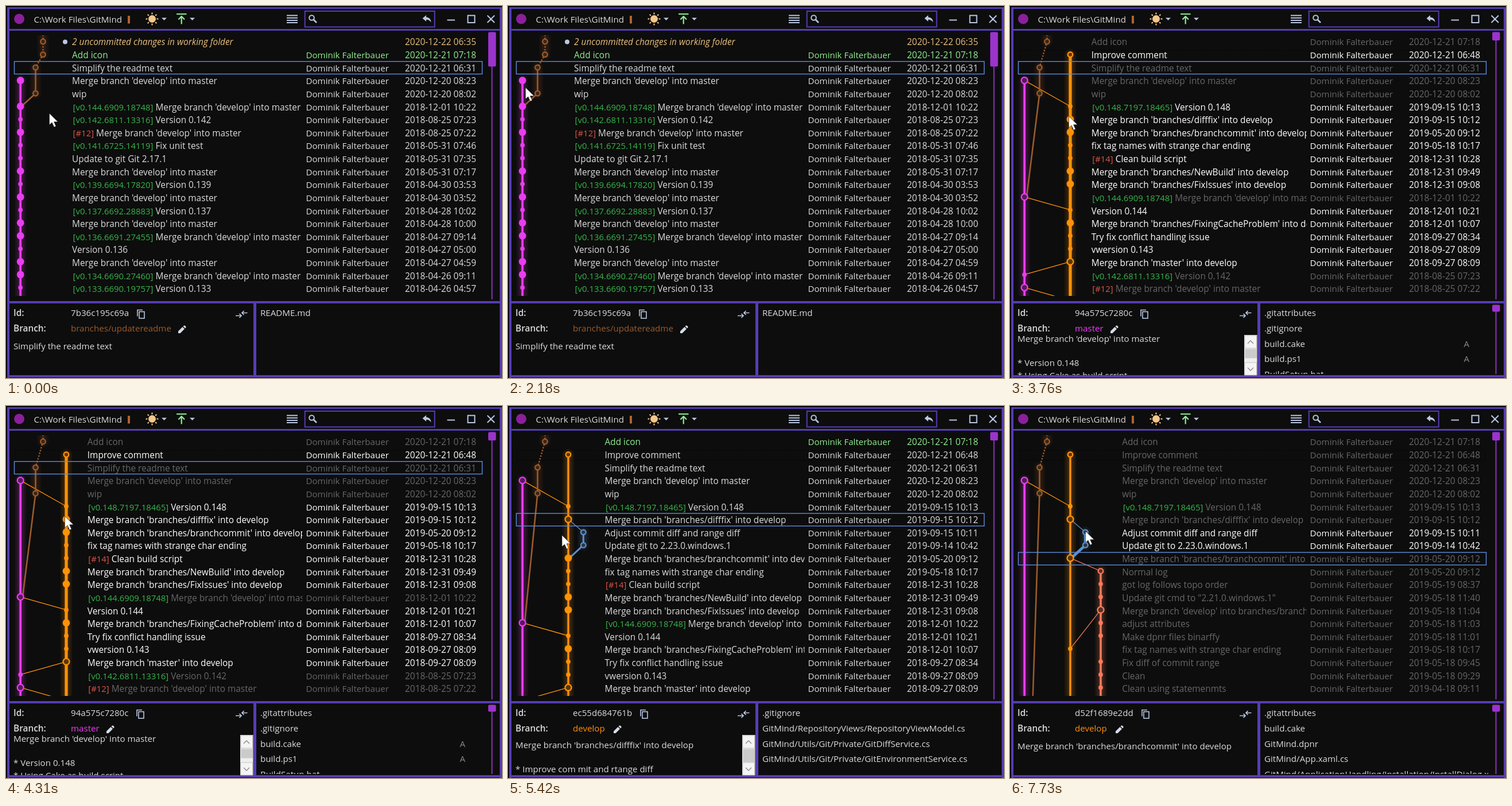
These frames come from a looping animation (864x648 px, 8000 ms). An HTML page:

```html
<!DOCTYPE html>
<html lang="en">
<head>
<meta charset="utf-8">
<title>Commit graph</title>
<style>
  html, body { margin: 0; width: 100%; height: 100%; overflow: hidden; background: #000; }
  svg { display: block; width: 100vw; height: 100vh; }
  text { font: 15.1px "Open Sans", "Noto Sans", sans-serif; fill: #dcdcdc; white-space: pre; }
  .message { font-size: 15.38px; }
  .date { font-size: 15.45px; }
  .tag { font-size: 14.9px; }
  .bold { font-size: 15.4px; font-weight: 600; }
  .line { fill: none; stroke: #b9c7e4; stroke-width: 2; }
</style>
</head>
<body>
<svg viewBox="0 0 864 648" xmlns="http://www.w3.org/2000/svg">
  <defs>
    <clipPath id="graphClip"><rect x="7" y="51" width="400" height="454"/></clipPath>
    <clipPath id="textClip"><rect x="90" y="44" width="426.5" height="468"/></clipPath>
    <clipPath id="infoClip"><rect x="7" y="519" width="400" height="124"/></clipPath>
    <clipPath id="fileClip"><rect x="437" y="519" width="396" height="122"/></clipPath>
    <g id="pencil" fill="#d5dbe8"><path d="M0 10.5V14H3.5L11 6.500 7.500 3ZM8.500 2 12 5.500 13.500 4Q14 3 13 2L12 1Q11 0 10 .7Z"/></g>
    <g id="copy" class="line" style="stroke-width:1.6"><path d="M1 12V1H10"/><rect x="4" y="4" width="9" height="11.500"/></g>
  </defs>
  <rect x="2" y="2" width="862" height="646" fill="#0d0d0d"/>
  <g fill="#553db4">
    <rect x="2" y="2" width="862" height="3"/>
    <rect x="2" y="2" width="4" height="646"/>
    <rect x="860" y="2" width="4" height="646"/>
    <rect x="2" y="40" width="862" height="3"/>
    <rect x="2" y="514" width="862" height="4"/>
    <rect x="2" y="643" width="862" height="4"/>
    <rect x="431" y="514" width="5" height="132"/>
  </g>
  <circle cx="23" cy="22.500" r="9" fill="#8c1f9c"/>
  <text x="48.500" y="28.700" style="font-size:15.2px">C:\Work Files\GitMind</text>
  <rect x="212" y="17" width="4" height="13.500" fill="#b0652f"/>
  <g id="sun" stroke="#f3c98f" stroke-width="2"><circle cx="254.500" cy="22.500" r="6.500" fill="#f5c78a" stroke="none"/></g>
  <path d="M271 20.500h9l-4.500 4.500ZM320 20.500h9l-4.500 4.500Z" fill="#b9c7e4"/>
  <path d="M297 14H314.500M305.700 31.500V18M300.500 23.500 305.700 18 311 23.500" fill="none" stroke="#8eec92" stroke-width="2.200"/>
  <path class="line" d="M489 16.500h19M489 20.700h19M489 24.900h19M489 29.100h19"/>
  <rect x="520.700" y="9" width="226" height="27.500" fill="none" stroke="#553db4" stroke-width="2"/>
  <g class="line"><circle cx="532.500" cy="20.500" r="4.300"/><path d="M535.500 23.500 541 29" stroke-width="2.600"/></g>
  <path d="M725.500 21.500 732 16V19.500Q740 20 740.500 28.500 738 24 732 23.800V27Z" fill="#b9c7e4"/>
  <path class="line" d="M768.500 24.500H782M804.500 16.500H816.500V29H804.500ZM838.500 16.500 851 29M851 16.500 838.500 29"/>
  <path class="line" style="stroke-width:1.700" d="M400 539.500H410M406.500 536 410 539.500 406.500 543M420.500 534.500H411M414.500 531 411 534.500 414.500 538"/>
  <text class="bold" x="13" y="540">Id:</text>
  <text class="bold" x="13" y="566.500">Branch:</text>
  <g id="view"></g>
  <path id="cursor" d="M0 0V20L4.600 16 8.200 24 11.600 22.500 8.200 14.800H15Z" fill="#fff" stroke="#111" stroke-width=".6"/>
</svg>
<script>
const $ = id => document.getElementById(id);
const LOOP = 8000, ROWS = 20, AUTHOR = 'Dominik Falterbauer';

const branches = {
  u: { x: 64.5, color: '#9c5b2b', width: 2.5, parent: 's' },
  m: { x: 25.2, color: '#e93df2', width: 3.8 },
  s: { x: 51.5, color: '#9c5b2b', width: 2.6, parent: 'm' },
  d: { x: 105, color: '#ff9108', width: 3.4 },
  b: { x: 131.3, color: '#5f8fc6', width: 3, parent: 'd' },
  c: { x: 158, color: '#f97a5c', width: 3.6, parent: 'd' }
};
const order = Object.keys(branches).join('');

// Each line: branch, node kind, date, text. A kind naming a branch is a merge from it;
// "x" merges from an unlisted branch, "o" is a ring, "." a plain dot.
const log = `
uo 2020-12-22 06:35 2 uncommitted changes in working folder
uo 2020-12-21 07:18 Add icon
do 2020-12-21 06:48 Improve comment
so 2020-12-21 06:31 Simplify the readme text
md 2020-12-20 08:23 Merge branch 'develop' into master
so 2020-12-20 08:02 wip
d. 2019-09-15 10:13 [v0.148.7197.18465] Version 0.148
db 2019-09-15 10:12 Merge branch 'branches/difffix' into develop
bo 2019-09-15 10:11 Adjust commit diff and range diff
bo 2019-09-14 10:42 Update git to 2.23.0.windows.1
dc 2019-05-20 09:12 Merge branch 'branches/branchcommit' into develop
co 2019-05-20 09:12 Normal log
c. 2019-05-19 08:37 got log follows topo order
c. 2019-05-18 11:40 Update git cmd to "2.21.0.windows.1"
cd 2019-05-18 11:04 Merge branch 'develop' into branches/branchcommit
c. 2019-05-18 11:03 adjust attributes
c. 2019-05-18 11:01 Make dpnr files binarffy
d. 2019-05-18 10:17 fix tag names with strange char ending
c. 2019-05-18 09:45 Fix diff of commit range
c. 2019-05-18 09:29 Clean
c. 2019-04-18 09:11 Clean using statemenmts
${'c. 2019-04-18 09:00 Clean\n'.repeat(11)}d. 2018-12-31 10:28 [#14] Clean build script
dx 2018-12-31 09:49 Merge branch 'branches/NewBuild' into develop
dx 2018-12-31 09:08 Merge branch 'branches/FixIssues' into develop
md 2018-12-01 10:22 [v0.144.6909.18748] Merge branch 'develop' into master
d. 2018-12-01 10:21 Version 0.144
dx 2018-12-01 10:07 Merge branch 'branches/FixingCacheProblem' into develop
d. 2018-09-27 08:34 Try fix conflict handling issue
d. 2018-09-27 08:09 vwersion 0.143
dm 2018-09-27 08:09 Merge branch 'master' into develop
m. 2018-08-25 07:23 [v0.142.6811.13316] Version 0.142
md 2018-08-25 07:22 [#12] Merge branch 'develop' into master
d. 2018-08-25 07:20 Version 0.142
m. 2018-05-31 07:46 [v0.141.6725.14119] Fix unit test
m. 2018-05-31 07:35 Update to git Git 2.17.1
md 2018-05-31 07:17 Merge branch 'develop' into master
m. 2018-04-30 03:53 [v0.139.6694.17820] Version 0.139
md 2018-04-30 03:52 Merge branch 'develop' into master
m. 2018-04-28 10:02 [v0.137.6692.28883] Version 0.137
md 2018-04-28 10:00 Merge branch 'develop' into master
md 2018-04-27 09:14 [v0.136.6691.27455] Merge branch 'develop' into master
m. 2018-04-27 05:00 Version 0.136
md 2018-04-27 04:59 Merge branch 'develop' into master
md 2018-04-26 09:11 [v0.134.6690.27460] Merge branch 'develop' into master
m. 2018-04-26 04:57 [v0.133.6690.19757] Version 0.133`.trim().split('\n').map(l => {
  const [, tag, text] = l.slice(20).match(/^(\[.*?\])?(.*)/);
  return { branch: l[0], kind: l[1], date: l.slice(3, 19), tag, text };
});

const details = {
  readme: { id: '7b36c195c69a', branch: 'branches/updatereadme', color: '#9c5b2b', copyX: 228, editX: 300,
    top: 598, text: ['Simplify the readme text'], files: ['README.md'] },
  master: { id: '94a575c7280c', branch: 'master', color: '#f03df5', copyX: 227, editX: 175, thumb: 16, scroll: true,
    top: 585, text: ["Merge branch 'develop' into master", '', '* Version 0.148', '* Using Cake as build script'],
    files: ['.gitattributes', '.gitignore', 'build.cake', 'build.ps1', 'BuildSetup.bat'], added: [2, 3] },
  difffix: { id: 'ec55d684761b', branch: 'develop', color: '#ff9108', copyX: 230, editX: 184, thumb: 23,
    top: 595.5, text: ["Merge branch 'branches/difffix' into develop", '', '* Improve com mit and rtange diff'],
    files: ['.gitignore', 'GitMind/RepositoryViews/RepositoryViewModel.cs',
      'GitMind/Utils/Git/Private/GitDiffService.cs', 'GitMind/Utils/Git/Private/GitEnvironmentService.cs'] },
  branchcommit: { id: 'd52f1689e2dd', branch: 'develop', color: '#ff9108', copyX: 229, editX: 184, scroll: true,
    top: 598, text: ["Merge branch 'branches/branchcommit' into develop"],
    files: ['.gitattributes', 'build.cake', 'GitMind.dpnr', 'GitMind/App.xaml.cs',
      'GitMind/ApplicationHandling/Installation/InstallDialog.xaml'] }
};

// Every step keeps what the previous one set.
const steps = [
  { at: 0, tip: [75.5, 187], shown: 'ums', scroll: 0, selected: 2, hover: '', info: 'readme' },
  { at: 100, tip: [68.5, 185] },
  { at: 2180, tip: [30.5, 142] },
  { at: 2260, tip: [22.5, 131], hover: 'm' },
  { at: 3120, shown: 'umsd', scroll: 1, info: 'master' },
  { at: 3370, tip: [40, 134], hover: '' },
  { at: 3450, tip: [66, 158] },
  { at: 3530, tip: [82, 178] },
  { at: 3680, tip: [94, 188] },
  { at: 3760, tip: [102.5, 192], hover: 'd' },
  { at: 4380, shown: 'umsdb', selected: 6, hover: '', info: 'difffix' },
  { at: 5190, tip: [103, 197], hover: 'd' },
  { at: 5265, tip: [101, 205] },
  { at: 5340, tip: [98, 215], hover: '' },
  { at: 5415, tip: [94, 225] },
  { at: 5490, tip: [90, 234] },
  { at: 5565, tip: [89, 242] },
  { at: 5640, tip: [91, 247] },
  { at: 5870, tip: [107.5, 255] },
  { at: 6020, tip: [107.5, 264], selected: 9, info: 'branchcommit' },
  { at: 6130, shown: 'umsdbc' },
  { at: 7410, tip: [119, 219] },
  { at: 7730, tip: [131.5, 218], hover: 'b' }
];
steps.forEach((step, i) => { steps[i] = { ...steps[i - 1], ...step }; });

const label = (x, y, text, attrs = '') => `<text x="${x}" y="${y}" ${attrs}>${text}</text>`;
const box = (x, y, w, h, attrs) => `<rect x="${x}" y="${y}" width="${w}" height="${h}" ${attrs}/>`;
const stroke = (x1, y1, x2, y2, color, width, extra = '') =>
  `<path d="M${x1} ${y1}L${x2} ${y2}" stroke="${color}" stroke-width="${width}" fill="none" ${extra}/>`;
const scrollbar = (top, thumb, bottom) => stroke(846.5, top, 846.5, bottom, '#8f31bd', 2) +
  box(840, top, 13.5, thumb, 'rx="2" fill="#9a34cb"');

function drawGraph(entries, { scroll, hover, shown }) {
  const rowY = i => 62 + 22.55 * (i - scroll);
  const next = (i, branch) => entries.findIndex((e, j) => j > i && e.branch === branch);
  const dots = 'stroke-dasharray="2.5 2.5"';
  let glow = '', links = '', trunks = '', nodes = '';

  for (const key of shown) {
    const { x, color, width, parent } = branches[key];
    const rows = entries.flatMap((e, i) => e.branch === key ? [i] : []);
    const first = rows[0], last = rows[rows.length - 1];
    const top = key === 'u' ? 40 : rowY(first);
    const bottom = parent ? rowY(last) : 520;
    const wide = width + (key === hover ? 1.8 : 0);
    const dash = key === 'u' ? dots : '';
    for (const spread of [20, 14, 9])
      glow += stroke(x, top, x, bottom, color, spread, 'opacity=".07" stroke-linecap="round"');
    trunks += stroke(x, top, x, bottom, color, wide, dash);
    const end = parent ? next(last, parent) : -1;
    if (end >= 0) {
      const gap = parent === 's' ? 0 : 4;
      trunks += stroke(x, rowY(last), branches[parent].x + gap, rowY(end) - gap / 2, color, wide, dash);
    }
  }

  entries.forEach(({ branch, kind }, i) => {
    const { x, color } = branches[branch], y = rowY(i);
    const open = shown.includes(kind), ring = open || kind === 'o';
    if (open) {
      const target = next(i, kind);
      const tint = branches[order.indexOf(kind) > order.indexOf(branch) ? kind : branch].color;
      if (target >= 0) links += stroke(x, y, branches[kind].x, rowY(target), tint, 1.3);
    }
    const radius = open ? 5.5 : kind === 'o' ? 4.3 : kind === '.' ? 3.9 : 6.4;
    const paint = ring ? `color-mix(in srgb, ${color} 32%, #0d0d0d)` : color;
    nodes += `<circle cx="${x}" cy="${y}" r="${radius}" style="fill:${paint}" stroke="${color}" stroke-width="${ring ? 2.3 : 0}"/>`;
  });
  return `<g clip-path="url(#graphClip)">${glow}${links}${trunks}${nodes}</g>`;
}

function drawRows(entries, { scroll, hover, shown }) {
  const left = 35 + 26.7 * shown.length;
  let messages = '', columns = '';
  entries.slice(scroll, scroll + ROWS).forEach((e, i) => {
    const y = 68.4 + 22.63 * i;
    const pending = e.text.includes('uncommitted');
    const normal = pending ? '#e9bf7c' : e.branch === 'u' ? '#90ee90' : '#dcdcdc';
    const color = !hover ? normal : hover === e.branch ? '#fff' : '#676767';
    const fill = `style="fill:${color}${pending ? ';font-style:italic' : ''}"`;
    const tagColor = e.tag && e.tag[1] === '#' ? '#dc5548' : '#36b54a';
    const tag = e.tag ? `<tspan class="tag" dx="1.5" fill="${tagColor}">${e.tag}</tspan>` : '';
    messages += label(left, y, tag + e.text, `class="message" ${fill}`);
    if (pending) columns += `<circle cx="103" cy="${y - 5.9}" r="4" fill="#b9c7e4"/>`;
    else columns += label(522.5, y, AUTHOR, fill);
    columns += label(695, y, e.date, `class="date" style="fill:${color}"`);
  });
  return `<g clip-path="url(#textClip)">${messages}</g>${columns}`;
}

function drawDetails(info) {
  const { id, branch, color, copyX, editX, top, text, files, added = [], thumb, scroll } = details[info];
  const body = text.map((line, i) => label(13, top + 21.2 * i, line)).join('');
  const list = files.map((file, i) => label(443, 540.3 + 26.7 * i, file) +
    (added.includes(i) ? label(790.5, 540.3 + 26.7 * i, 'A', 'style="fill:#8c8c8c"') : '')).join('');
  const bar = thumb ? box(408, 573, 22.5, 70, 'fill="#efefef"') + box(409, 597.5, 21, thumb, 'fill="#cbcbcb"') +
    box(409, 574, 20.5, 22, 'fill="#f4f4f4" stroke="#c4c4c4"') + box(409, 621, 20.5, 22, 'fill="#f4f4f4" stroke="#c4c4c4"') +
    '<path d="M414 588l5-5 5 5M414 630l5 5 5-5" fill="none" stroke="#888" stroke-width="1.3"/>' : '';
  return label(113, 540.3, id) + label(113, 567, branch, `style="fill:${color}"`) +
    `<use href="#copy" x="${copyX}" y="528.5"/><use href="#pencil" x="${editX}" y="556"/>` +
    `<g clip-path="url(#infoClip)">${body}</g>${bar}<g clip-path="url(#fileClip)">${list}</g>` +
    (scroll ? scrollbar(520.5, 12, 641) : '');
}

function draw(step) {
  const entries = log.filter(e => step.shown.includes(e.branch));
  const focus = step.scroll ? box(16.5, 77.5, 811, 17, 'fill="none" stroke="#000" stroke-dasharray="1 2"') : '';
  $('view').innerHTML = focus + drawGraph(entries, step) + drawRows(entries, step) +
    box(14.5, 96.6 + 22.63 * (step.selected - 2), 815, 21.9, 'fill="none" stroke="#5c8be0" stroke-width="1.4"') +
    scrollbar(45.5, step.scroll ? 14.5 : 60, 511) + drawDetails(step.info);
  $('cursor').setAttribute('transform', `translate(${step.tip})`);
}

for (let angle = 0; angle < 360; angle += 45)
  $('sun').innerHTML += `<path d="M254.5 14.500V11.500" transform="rotate(${angle} 254.5 22.5)"/>`;

let current;
const start = performance.now();
function frame() {
  const t = (performance.now() - start) % LOOP;
  const step = steps.filter(s => s.at <= t).pop();
  if (step !== current) draw(current = step);
  requestAnimationFrame(frame);
}
frame();
</script>
</body>
</html>
```
